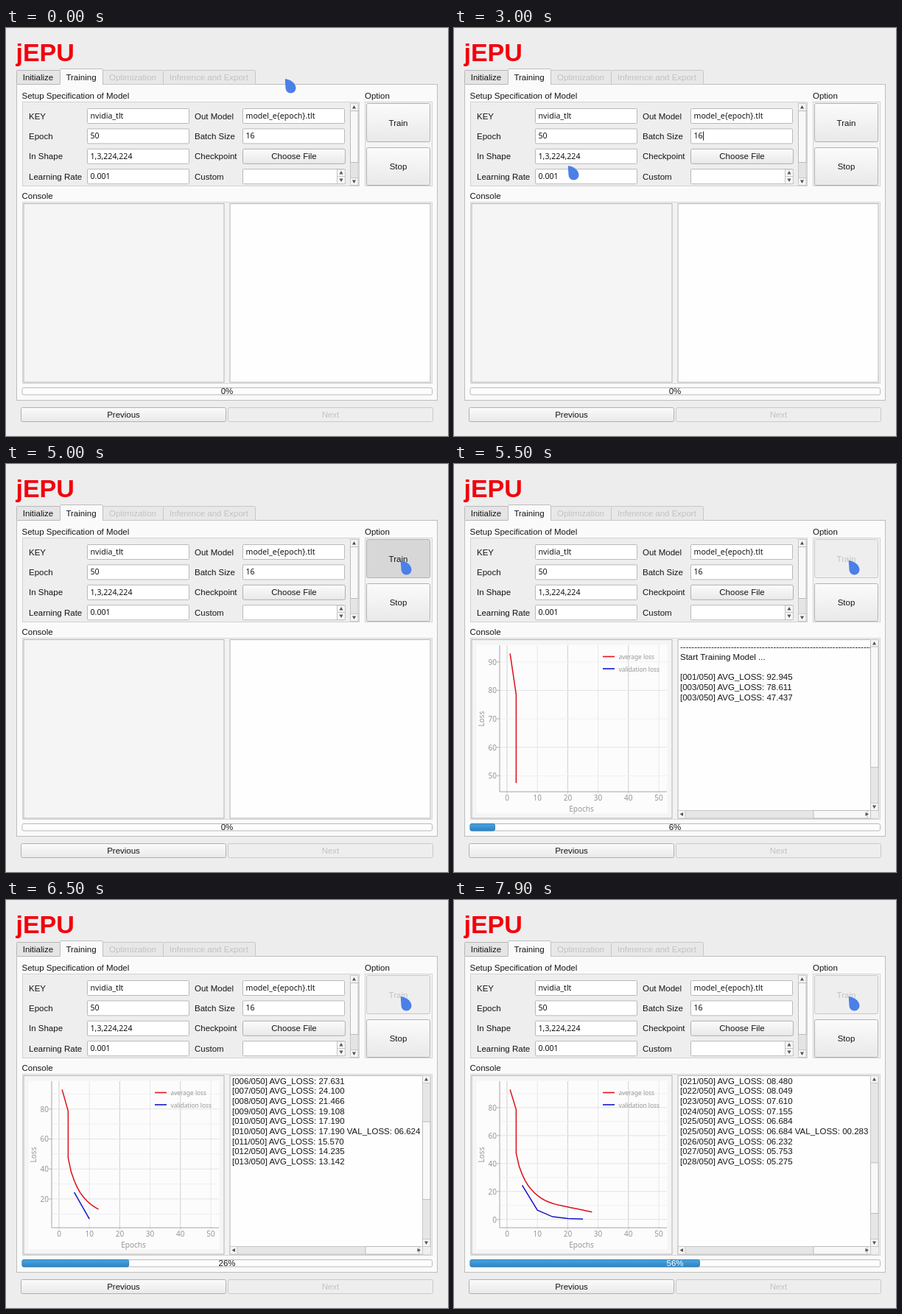
Recreate the animation shown at these times as an HTML page. Size 600 px wide and 554 px high, loop 8000 ms.

```html
<!DOCTYPE html>
<html lang="en">
<head>
<meta charset="utf-8">
<title>Model training</title>
<style>
html, body { margin: 0; width: 100%; height: 100%; overflow: hidden; background: #eeedee }
svg { display: block }
text { font: 11.5px "Liberation Sans", Arial, sans-serif; fill: #151515; white-space: pre }
.mid { text-anchor: middle }
.end { text-anchor: end }
.off { fill: #c2c2c2 }
.val { font: 10.6px "Noto Sans", sans-serif }
.tick { font: 10px "Noto Sans", sans-serif; fill: #969696 }
.key { font: 8.3px "Noto Sans", sans-serif; fill: #969696 }
.name { font: bold 34px "Liberation Sans", Arial, sans-serif; fill: #f2000c }
</style>
</head>
<body>
<svg width="600" height="554" viewBox="0 0 600 554">
<defs>
<linearGradient id="face" x2="0" y2="1"><stop stop-color="#fbfbfb"/><stop offset="1" stop-color="#e9e9e9"/></linearGradient>
<linearGradient id="blue" x2="0" y2="1"><stop stop-color="#4ba5de"/><stop offset="1" stop-color="#2b83c4"/></linearGradient>
<clipPath id="log"><rect x="304" y="239" width="261.500" height="231"/></clipPath>
</defs>
<g id="base"></g>
<g id="live"></g>
</svg>
<script>
const $ = id => document.getElementById(id);
const rect = (x, y, w, h, fill, stroke = 'none', r = 0) =>
  `<rect x="${x}" y="${y}" width="${w}" height="${h}" rx="${r}" fill="${fill}" stroke="${stroke}"/>`;
const text = (x, y, s, cls = '', more = '') => `<text x="${x}" y="${y}" class="${cls}" ${more}>${s}</text>`;
const path = (d, stroke, width = 1, fill = 'none') =>
  `<path d="${d}" fill="${fill}" stroke="${stroke}" stroke-width="${width}"/>`;
const button = (x, y, w, h, s, off, fill = 'url(#face)') =>
  rect(x, y, w, h, fill, off ? '#c9c9c9' : '#b0b0b0', 2) + text(x + w / 2, y + h / 2 + 4, s, off ? 'mid off' : 'mid');
const arrow = (x, y, dx, dy) =>
  path(`M${x + 2.5 * dx} ${y + 2.5 * dy}L${x - 2 * dx - 2.5 * dy} ${y - 2 * dy - 2.5 * dx}L${x - 2 * dx + 2.5 * dy} ${y - 2 * dy + 2.5 * dx}Z`, 'none', 0, '#555');

const rows = [
  ['KEY', 'nvidia_tlt', 'Out Model', 'model_e{epoch}.tlt'],
  ['Epoch', '50', 'Batch Size', '16'],
  ['In Shape', '1,3,224,224', 'Checkpoint', null],
  ['Learning Rate', '0.001', 'Custom', '']
];
const rowY = i => 109.5 + 27.4 * i;
const field = (x, y, s) => rect(x, y, 138, 20, '#fff', '#b9b9b9', 1) + text(x + 4, y + 13.5, s, 'val');

function drawBase() {
  let s = text(13.5, 45, 'jEPU', 'name');
  s += rect(14.5, 76.5, 571, 429, '#fbfafb', '#bdbdbd');
  [[14, 59, 'Initialize'], [131, 82, 'Optimization'], [213, 125, 'Inference and Export']].forEach(([x, w, label], i) => {
    s += rect(x + .5, 57.5, w, 19, i ? '#e9e8e9' : '#e6e5e6', i ? '#c8c8c8' : '#b8b8b8', 1) +
      text(x + w / 2, 71, label, i ? 'mid off' : 'mid');
  });
  s += rect(73.5, 55.5, 58, 23, '#fbfafb', '#bdbdbd', 2) + rect(73, 77, 59, 3, '#fbfafb') + text(102, 70.5, 'Training', 'mid');
  s += text(21.5, 95.5, 'Setup Specification of Model') + text(487, 95.5, 'Option') + text(21.5, 231.5, 'Console');
  s += rect(22.5, 100.5, 457, 114, '#efeeef', '#d2d2d2') + rect(487.5, 100.5, 91, 114, '#f4f4f4', '#d2d2d2');

  rows.forEach(([a, av, b, bv], i) => {
    const y = rowY(i);
    s += text(31, y + 14, a) + field(110.5, y, av) + text(256, y + 14, b);
    s += bv === null ? button(321.5, y, 139, 20, 'Choose File') : field(321.5, y, bv);
  });
  s += rect(449.5, 192, 11, 19.500, '#f6f6f6', '#c4c4c4') + path('M449 201.500h12', '#c4c4c4') +
    arrow(455, 196.500, 0, -1) + arrow(455, 206.500, 0, 1);
  s += rect(467.5, 102.5, 10.500, 111, '#e4e4e4', '#c6c6c6') + rect(467.5, 102.5, 10.500, 10, '#f6f6f6', '#c6c6c6') +
    rect(467.5, 203.5, 10.500, 10, '#f6f6f6', '#c6c6c6') + rect(467.5, 112.5, 10.500, 70, '#f8f8f8', '#bcbcbc') +
    arrow(472.5, 107.5, 0, -1) + arrow(472.5, 208.5, 0, 1);

  s += button(489.5, 162.5, 86, 51, 'Stop');
  s += rect(22.5, 236.5, 556, 246, '#f2f2f2', '#d6d6d6');
  s += rect(24, 238.5, 272, 242.500, '#f5f5f6', '#b5b5b5') + rect(304, 238.5, 272, 242.500, '#fefefe', '#b5b5b5');
  s += button(20.5, 515.5, 278, 19, 'Previous') + button(301.5, 515.5, 278, 19, 'Next', true, '#eeeeee');
  $('base').innerHTML = s;
}

// Training data: average loss per epoch and validation loss every fifth epoch
const loss = [92.945, 78.611, 47.437, 37.979, 32.216, 27.631, 24.1, 21.466, 19.108, 17.19, 15.57, 14.235, 13.142, 12.238,
  11.49, 10.872, 10.313, 9.83, 9.36, 8.914, 8.48, 8.049, 7.61, 7.155, 6.684, 6.232, 5.753, 5.275];
const valid = [24.482, 6.624, 1.928, .715, .283];
const epochOf = i => i === 1 ? 3 : i + 1;
const num = v => v.toFixed(3).padStart(6, '0');

function drawChart(count) {
  const avg = loss.slice(0, count), val = valid.slice(0, Math.floor(count / 5));
  const all = count ? [...avg, ...val] : [0, 1];
  const hi = Math.max(...all), lo = Math.min(...all), scale = 175.8 / Math.max(hi - lo, 10);
  const px = e => 72 + 4.12 * e, py = v => 433.2 - (v - lo) * scale;
  const step = [1, 2, 5, 10, 20, 50].find(n => n * scale >= 22);
  const sub = step === 2 || step === 20 ? step / 2 : step;
  const line = (pts, color) => pts.length > 1 ? path('M' + pts.map(p => p.join(' ')).join('L'), color, 1.5) : '';

  let s = rect(30.5, 245.5, 259, 229, '#fcfcfd');
  for (let e = 0; e <= 50; e += 10)
    s += path(`M${px(e)} 246V448`, e % 20 ? '#e8e8ea' : '#d0d0d3') + text(px(e), 457, e, 'tick mid');
  for (let v = Math.ceil((lo - 11.8 / scale) / sub) * sub; py(v) > 247; v += sub) {
    s += path(`M62 ${py(v)}H289`, v % (sub * 2) ? '#f0f0f2' : '#e4e4e6');
    if (v % step === 0) s += path(`M58 ${py(v)}h4`, '#b5b5b5') + text(58, py(v) + 4, v, 'tick end');
  }
  s += path('M62 246V445H289', '#a5a5a5');
  s += text(173, 472, 'Epochs', 'tick mid') + text(0, 0, 'Loss', 'tick mid', 'transform="translate(41 346) rotate(-90)"');
  s += path('M202 261.500h16', '#e31218', 1.6) + text(223.5, 265, 'average loss', 'key');
  s += path('M202 278h16', '#1414c8', 1.6) + text(223.5, 281.500, 'validation loss', 'key');
  s += line(avg.map((v, i) => [px(epochOf(i)), py(v)]), '#dc1218');
  return s + line(val.map((v, i) => [px(5 * i + 5), py(v)]), '#1414c8');
}

function drawLog(count) {
  const lines = ['-'.repeat(80), 'Start Training Model ...', ''];
  for (let i = 0; i < count; i++) {
    const entry = `[${String(epochOf(i)).padStart(3, '0')}/050] AVG_LOSS: ${num(loss[i])}`;
    lines.push(entry);
    if (i % 5 === 4) lines.push(`${entry} VAL_LOSS: ${num(valid[(i - 4) / 5])}`);
  }
  // The view jumps nine lines each time the text runs too low
  const last = lines.length - 1, top = Math.max(0, Math.floor((last - 6) / 9) * 9);
  const first = top ? 249.500 : 252, total = last + 16.7;
  const barY = 248 + 213 * Math.max(0, top - .6) / total, barH = 213 * 16.7 / total;
  let s = '<g clip-path="url(#log)">';
  lines.slice(top).forEach((l, i) => s += text(307, first + 13.7 * i, l));
  s += '</g>' + rect(565.5, 238.5, 10.500, 232, '#e6e6e6', '#c6c6c6') + rect(304, 470.5, 261.500, 10.500, '#e6e6e6', '#c6c6c6');
  s += rect(565.5, 238.5, 10.500, 10, '#f6f6f6', '#c6c6c6') + rect(565.5, 460.5, 10.500, 10, '#f6f6f6', '#c6c6c6');
  s += rect(304, 470.5, 10, 10.500, '#f6f6f6', '#c6c6c6') + rect(555.5, 470.5, 10, 10.500, '#f6f6f6', '#c6c6c6');
  s += rect(565.5, barY, 10.500, barH, '#f8f8f8', '#bcbcbc') + rect(488, 470.5, 73, 10.500, '#f8f8f8', '#bcbcbc');
  s += rect(566, 471, 10, 10, '#efefef');
  return s + arrow(570.5, 243.5, 0, -1) + arrow(570.5, 465.5, 0, 1) + arrow(309, 475.5, -1, 0) + arrow(560.5, 475.5, 1, 0);
}

// Pointer stops: time, x, y
const stops = [[0, 379, 69], [500, 384, 82], [1200, 408, 117], [1700, 408, 117], [2200, 342, 147], [2400, 342, 147],
  [2800, 185, 195], [3000, 155, 187], [3600, 141, 187], [3900, 146, 188], [4450, 420, 176], [4800, 536, 131], [8000, 536, 131]];

function drawPointer(t) {
  const i = stops.findIndex(p => p[0] > t), a = stops[i - 1], b = stops[i];
  const u = (t - a[0]) / (b[0] - a[0]), k = u * u * (3 - 2 * u);
  const x = a[1] + (b[1] - a[1]) * k, y = a[2] + (b[2] - a[2]) * k;
  const inField = rows.some((r, n) => y > rowY(n) && y < rowY(n) + 20 &&
    (x > 110 && x < 249 || x > 321 && x < 449 && r[3] !== null));
  const shape = inField
    ? path('M-2.500 -8H2.500M0 -8V8M-2.500 8H2.500', '#5985e2', 2.4)
    : path('M0 0C6 .5 14.500 5.500 14.500 12.500A7 7 0 0 1 .5 12.500C.5 8 -.5 4 0 0Z', 'none', 0, '#4a80e8');
  return `<g transform="translate(${x} ${y})">${shape}</g>`;
}

function draw(t) {
  const started = t >= 5150, pressed = t >= 4900 && !started;
  const count = Math.max(0, Math.min(28, Math.floor(9.5 + (t - 6100) / 94)));
  const done = count * 2;
  let s = button(489.5, 102.5, 86, 52, 'Train', started, pressed ? '#d8d7d8' : started ? '#efeeef' : 'url(#face)');
  if (t >= 2350 && t < 4900 && (t - 2350) % 1000 < 700) s += path('M338.500 140.500v12', '#222');
  if (started) s += drawChart(count) + drawLog(count);
  s += rect(22, 488.5, 556.500, 9.500, '#fdfdfd', '#b9b9b9', 2);
  if (done) s += rect(22, 488.5, 5.56 * done, 9.500, 'url(#blue)', '#2c7fba', 2);
  s += text(300, 497, done + '%', 'mid', done > 50 ? 'style="fill:#fff"' : '');
  $('live').innerHTML = s + drawPointer(t);
}

drawBase();
const begin = performance.now();
(function tick() {
  draw((performance.now() - begin) % 8000);
  requestAnimationFrame(tick);
})();
</script>
</body>
</html>
```
